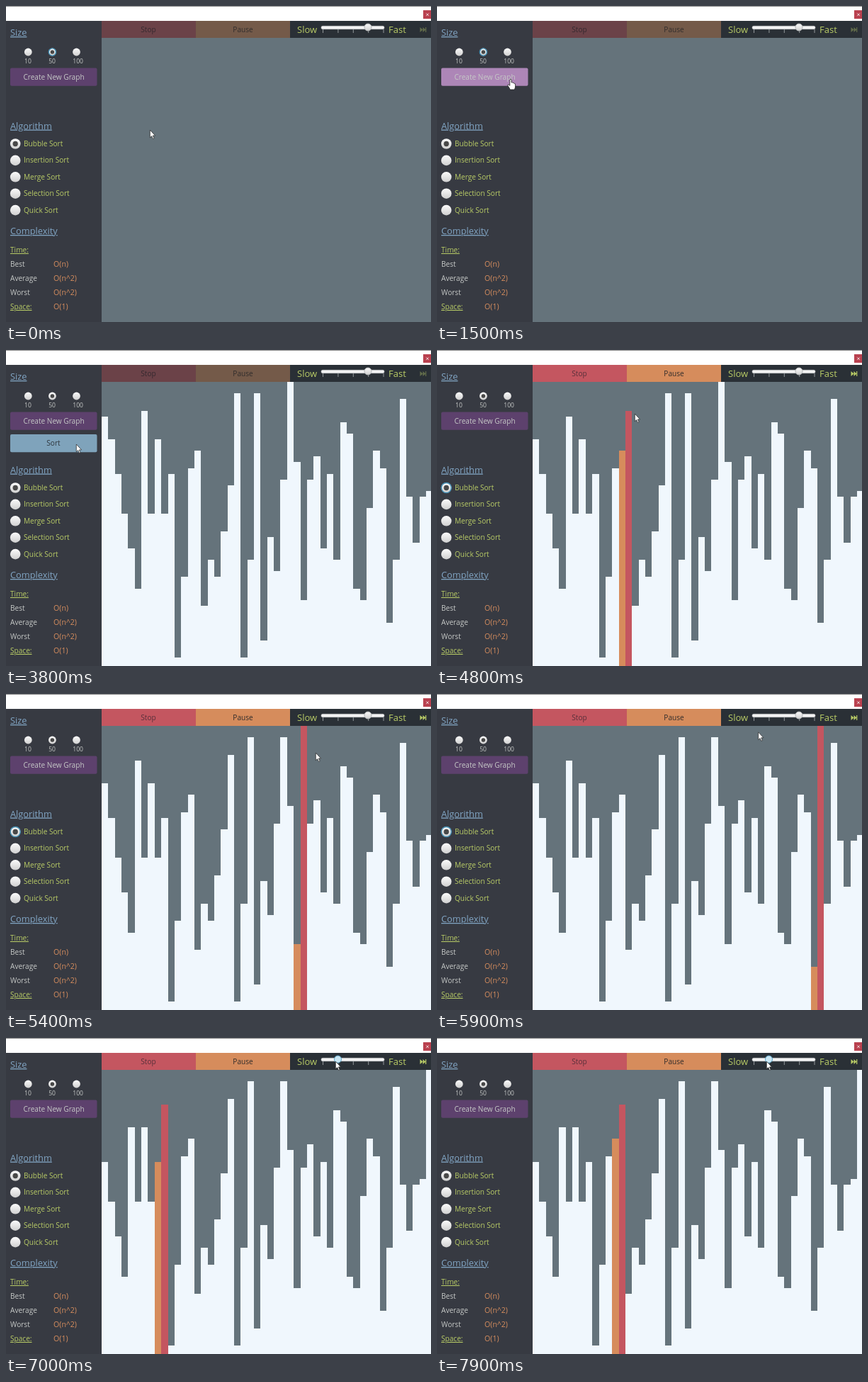
Animation of 600 by 446 pixels, one loop 8 s. Source, as an HTML page:

```html
<!DOCTYPE html>
<html lang="en">
<head>
<meta charset="utf-8">
<title>Sorting visualizer</title>
<style>
  html, body { margin: 0; width: 100%; height: 100%; overflow: hidden; background: #373a42; }
  svg { display: block; width: 600px; height: 446px; font: 10.1px "Open Sans", "Noto Sans", sans-serif; }
  .head { font-size: 12.8px; fill: #81a5c4; text-decoration: underline; }
  .sub { fill: #b9cc66; text-decoration: underline; }
  .lime { fill: #b9cc66; }
  .pale { fill: #c5c8c6; }
  .orange { fill: #d68d5e; font-size: 10.6px; }
  .mid { text-anchor: middle; }
</style>
</head>
<body>
<svg id="stage" viewBox="0 0 600 446">
  <defs>
    <linearGradient id="knob" x2="0" y2="1">
      <stop stop-color="#fbfbfb"/><stop offset="1" stop-color="#d0d0d0"/>
    </linearGradient>
  </defs>
  <rect width="600" height="446" fill="#373a42"/>
  <rect width="600" height="21" fill="#fff"/>
  <rect width="600" height="1" fill="#8d8d8d"/>
  <rect x="589" y="6" width="11" height="12" fill="#b9414f"/>
  <path d="M593.3 10.5l3.4 3.4m0-3.4l-3.4 3.4" stroke="#f3dfe1"/>
  <rect x="135" y="45" width="465" height="401" fill="#65737b"/>
  <g id="bars" shape-rendering="crispEdges"></g>
  <rect x="401" y="21" width="199" height="24" fill="#2a3036"/>
  <rect id="stop" x="135" y="21" width="133" height="24"/>
  <rect id="pause" x="268" y="21" width="133" height="24"/>
  <text id="stopText" class="mid" x="201" y="37">Stop</text>
  <text id="pauseText" class="mid" x="334.5" y="37">Pause</text>
  <text class="lime" x="411" y="38.3" font-size="13">Slow</text>
  <text class="lime" x="540" y="38.3" font-size="13">Fast</text>
  <path d="M447.5 33v5m21.4-5v5m21.4-5v5m21.4-5v5m21.3-5v5" stroke="#92979a"/>
  <rect x="445" y="28.3" width="89" height="4.4" rx="2" fill="#f4f4f4" stroke="#bfc2c4" stroke-width=".6"/>
  <circle id="thumb" cy="30" r="5" fill="url(#knob)"/>
  <path id="skip" d="M584.5 30l4 3.5-4 3.5zm4 0l4 3.5-4 3.5zm3.6 0h1.2v7h-1.2z"/>
  <g id="panel"></g>
  <rect id="create" x="6" y="87.5" width="122.5" height="25.3" rx="2"/>
  <text class="pale mid" x="67.5" y="104">Create New Graph</text>
  <g id="sort">
    <rect id="sortBox" x="6" y="119" width="122.5" height="25.3" rx="2"/>
    <text class="mid" x="67" y="135" fill="#2f363d">Sort</text>
  </g>
  <g id="cursor">
    <path id="arrow" d="M.3 0V10.8L2.7 8.6 4.4 12.4 6.1 11.7 4.4 7.9H7.6Z" fill="#fff" stroke="#222" stroke-width=".7"/>
    <path id="hand" d="M-1.2 1Q0-.8 1.1 1V5Q2.6 4.2 3.2 5.6 4.6 5 5.1 6.5 6.6 6.2 6.6 8V11Q6.3 13 5.4 15H-.8Q-1.8 12.4-4 9.6-4.6 7.6-2.8 7.9L-1.2 9.4Z" fill="#fff" stroke="#222" stroke-width=".8"/>
  </g>
</svg>
<script>
const LOOP = 8000, GRAPH_AT = 2300, SORT_AT = 4262, SLOW_AT = 6420;
const FAST_STEP = 39, SLOW_STEP = 210, PASS = 50;
const BAR_W = 9.35, UNIT = 8.1;
// How many units each bar falls short of the full height.
const gaps = [6, 10, 16, 23, 29, 36, 5, 23, 10, 23, 16, 48, 34, 15, 12, 39, 31, 34, 26, 18, 2, 48, 31, 2, 45,
  27, 33, 17, 0, 14, 38, 17, 13, 29, 16, 31, 7, 9, 36, 38, 22, 12, 15, 42, 31, 3, 20, 28, 20, 19];
// Pointer stops: time, x, y.
const stops = [[0, 203, 175], [400, 203, 175], [1200, 104, 103], [3500, 104, 103], [3800, 99, 133],
  [4300, 99, 133], [4800, 279, 90], [5400, 437, 83], [6300, 465, 33], [LOOP, 465, 33]];

const $ = id => document.getElementById(id);
function add(parent, tag, attrs, text = "") {
  const el = document.createElementNS("http://www.w3.org/2000/svg", tag);
  for (const k in attrs) el.setAttribute(k, attrs[k]);
  el.textContent = text;
  return parent.appendChild(el);
}
const label = (x, y, cls, text) => add($("panel"), "text", { x, y, class: cls }, text);
const fill = (id, color) => $(id).setAttribute("fill", color);
const show = (id, on) => $(id).setAttribute("visibility", on ? "visible" : "hidden");

// Returns the focus ring, which starts hidden.
function radio(x, y, r, chosen) {
  const dot = (radius, color) => add($("panel"), "circle", { cx: x, cy: y, r: radius, fill: color });
  dot(r - .3, "url(#knob)");
  if (chosen) dot(r * .48, "#484848");
  const ring = dot(r - .6, "none");
  ring.setAttribute("stroke", "#4490b5");
  ring.setAttribute("stroke-width", 1.4);
  ring.setAttribute("visibility", "hidden");
  return ring;
}

[["Size", 42], ["Algorithm", 173.5], ["Complexity", 322]].forEach(([s, y]) => label(6, y, "head", s));
const sizeRings = [10, 50, 100].map((n, i) => {
  const x = 31.3 + 34.1 * i;
  label(x - 5.2, 80.8, "pale", n).setAttribute("font-size", 8.6);
  return radio(x, 65, 5.7, i == 1);
});
const sortRings = ["Bubble", "Insertion", "Merge", "Selection", "Quick"].map((s, i) => {
  const y = 194.5 + 23.4 * i;
  label(25, y + 3.4, "lime", s + " Sort");
  return radio(13.2, y, 7.6, i == 0);
});
[["Time:", ""], ["Best", "O(n)"], ["Average", "O(n^2)"], ["Worst", "O(n^2)"], ["Space:", "O(1)"]].forEach(([s, cost], i) => {
  const y = 348 + 20 * i;
  label(6, y, i % 4 ? "pale" : "sub", s);
  label(67, y, "orange", cost);
});
const bars = gaps.map((_, i) => add($("bars"), "rect", { x: 135 + BAR_W * i, width: BAR_W }));

function stepAt(t) {
  if (t < SORT_AT) return -1;
  const fast = Math.min(t, SLOW_AT) - SORT_AT, slow = Math.max(0, t - SLOW_AT);
  return Math.floor(fast / FAST_STEP + slow / SLOW_STEP);
}

function drawBars(step) {
  const list = gaps.slice();
  let red = -1, orange = -1;
  for (let s = 0; s <= step; s++) {
    const j = s % PASS;
    if (j > 48) continue;
    [red, orange] = [j, j + 1];
    if (list[j] < list[j + 1]) {
      [list[j], list[j + 1]] = [list[j + 1], list[j]];
      [red, orange] = [orange, red];
    }
  }
  bars.forEach((bar, i) => {
    const y = 45 + UNIT * list[i];
    bar.setAttribute("y", y);
    bar.setAttribute("height", 446 - y);
    bar.setAttribute("fill", i == red ? "#c45660" : i == orange ? "#d68c5c" : "#f0f7fd");
  });
}

function pointer(t) {
  const i = stops.findIndex(s => s[0] > t), [a, b] = [stops[i - 1], stops[i]];
  const u = (t - a[0]) / (b[0] - a[0]), e = u * u * (3 - 2 * u);
  return [a[1] + (b[1] - a[1]) * e, a[2] + (b[2] - a[2]) * e];
}

function draw() {
  const t = Math.floor(performance.now() % LOOP / 100) * 100; // ten pictures a second
  const graph = t >= GRAPH_AT, sorting = t >= SORT_AT, slow = t >= SLOW_AT;
  const [x, y] = pointer(t);
  const over = top => x > 6 && x < 128 && y > top && y < top + 25;
  const onCreate = over(88) && !sorting, onSort = over(119) && graph && !sorting && t > 3800;

  show("bars", graph);
  if (graph) drawBars(stepAt(t));
  show("sort", graph && !sorting);
  fill("create", onCreate ? "#ad86b7" : "#5d416d");
  fill("sortBox", onSort ? "#a9c4d6" : "#7fa3bb");
  fill("stop", sorting ? "#c45660" : "#6b4248");
  fill("pause", sorting ? "#d68c5c" : "#745a49");
  fill("stopText", sorting ? "#58303a" : "#35292f");
  fill("pauseText", sorting ? "#302c2b" : "#312d2c");
  fill("skip", sorting ? "#b9cc66" : "#626d4b");
  sizeRings[1].setAttribute("visibility", graph ? "hidden" : "visible");
  sortRings[0].setAttribute("visibility", sorting && !slow ? "visible" : "hidden");

  const thumb = $("thumb");
  thumb.setAttribute("cx", slow ? 468.5 : 511);
  thumb.setAttribute("stroke", slow ? "#62acd0" : "#b5b8ba");
  thumb.setAttribute("fill", slow ? "#c9e6f3" : "url(#knob)");

  $("cursor").setAttribute("transform", `translate(${x} ${y})`);
  show("hand", onCreate || onSort);
  show("arrow", !onCreate && !onSort);
  requestAnimationFrame(draw);
}
draw();
</script>
</body>
</html>
```
